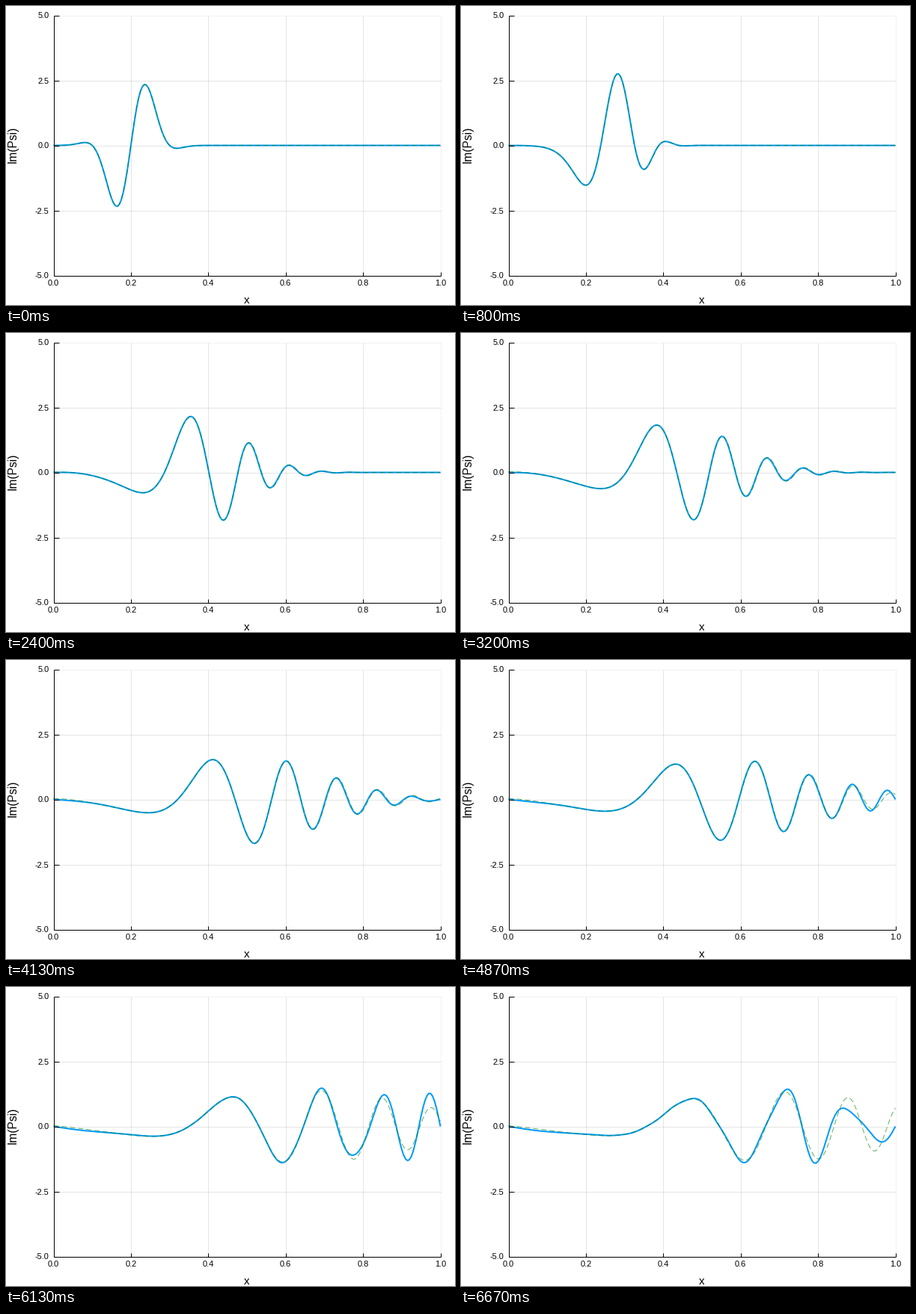
These frames come from a looping animation (600x400 px, 6.74 s). A matplotlib script:

```python
import numpy as np
import matplotlib.pyplot as plt
from matplotlib.animation import FuncAnimation

W, H, DPI = 600, 400, 100
PX = 72 / DPI                      # one pixel in points
FRAMES, LOOP_MS = 101, 6740
T_END = 1 / 64

# Gaussian packet on the unit interval
X0, SIGMA, K0 = 0.2, 0.05, 10 * np.pi
CELLS = 200
DX = 1 / CELLS
x = np.linspace(0, 1, CELLS + 1)


def free_packet(t):
    """Spreading packet on an unbounded line."""
    spread = 1 + 1j * t / SIGMA**2
    norm = (np.pi * SIGMA**2) ** -0.25 / np.sqrt(spread)
    gauss = np.exp(-(x - X0 - K0 * t) ** 2 / (2 * SIGMA**2 * spread))
    return norm * gauss * np.exp(1j * (K0 * (x - X0) - K0**2 * t / 2))


# Finite-difference box with hard walls, solved in its sine modes
modes = np.arange(1, CELLS)
sines = np.sin(np.pi * np.outer(x, modes))
energy = (1 - np.cos(np.pi * modes * DX)) / DX**2
weights = 2 * DX * sines.T @ free_packet(0)


def box_packet(t):
    return sines @ (weights * np.exp(-1j * energy * t))


def sx(v):
    return 63.5 + 517 * v


def sy(v):
    return 186.5 - 34.8 * v


plt.rcParams["font.family"] = "Liberation Sans"
fig = plt.figure(figsize=(W / DPI, H / DPI), dpi=DPI, facecolor="white")
ax = fig.add_axes([0, 0, 1, 1])
ax.set_xlim(0, W)
ax.set_ylim(H, 0)
ax.axis("off")


def rule(xs, ys, alpha=1.0, z=1):
    ax.plot(xs, ys, color="black", alpha=alpha, lw=PX, zorder=z,
            solid_capstyle="butt")


def label(px, py, text, size, **kw):
    ax.text(px, py, text, fontsize=size * PX, color="black", **kw)


left, right, top, bottom = sx(0), sx(1), sy(5), sy(-5)

for v in np.linspace(0, 1, 6):
    p = sx(v)
    if v > 0:
        rule([p, p], [top, bottom], 0.1 if v < 1 else 0.05)
    rule([p, p], [bottom, bottom - 5], z=4)
    label(p, 374.3, f"{v:.1f}", 11, ha="center", va="baseline")

for v in np.linspace(-5, 5, 5):
    p = sy(v)
    if v > -5:
        rule([left, right], [p, p], 0.1 if v < 5 else 0.05)
    rule([left, left + 7.5], [p, p], z=4)
    label(57.6, p + 4, f"{v:.1f}", 11, ha="right", va="baseline")

rule([left, left], [top, bottom + 0.5], z=4)
rule([left, right], [bottom, bottom], z=4)
label(322, 398, "x", 15, ha="center", va="baseline")
label(9.5, 185, "Im(Psi)", 15.5, ha="center", va="center", rotation=90)

box_line, = ax.plot([], [], color="#009afa", lw=2 * PX, zorder=2,
                    solid_joinstyle="round", solid_capstyle="butt")
free_line, = ax.plot([], [], color="#008000", alpha=0.62, lw=PX, zorder=3,
                     dash_capstyle="butt")
free_line.set_linestyle((0, (7, 4)))


def draw(i):
    t = T_END * i / (FRAMES - 1)
    box_line.set_data(sx(x), sy(box_packet(t).imag))
    free_line.set_data(sx(x), sy(free_packet(t).imag))
    return box_line, free_line


anim = FuncAnimation(fig, draw, frames=FRAMES, interval=LOOP_MS / FRAMES,
                     init_func=lambda: draw(0), repeat=True, repeat_delay=0)
plt.show()
```
